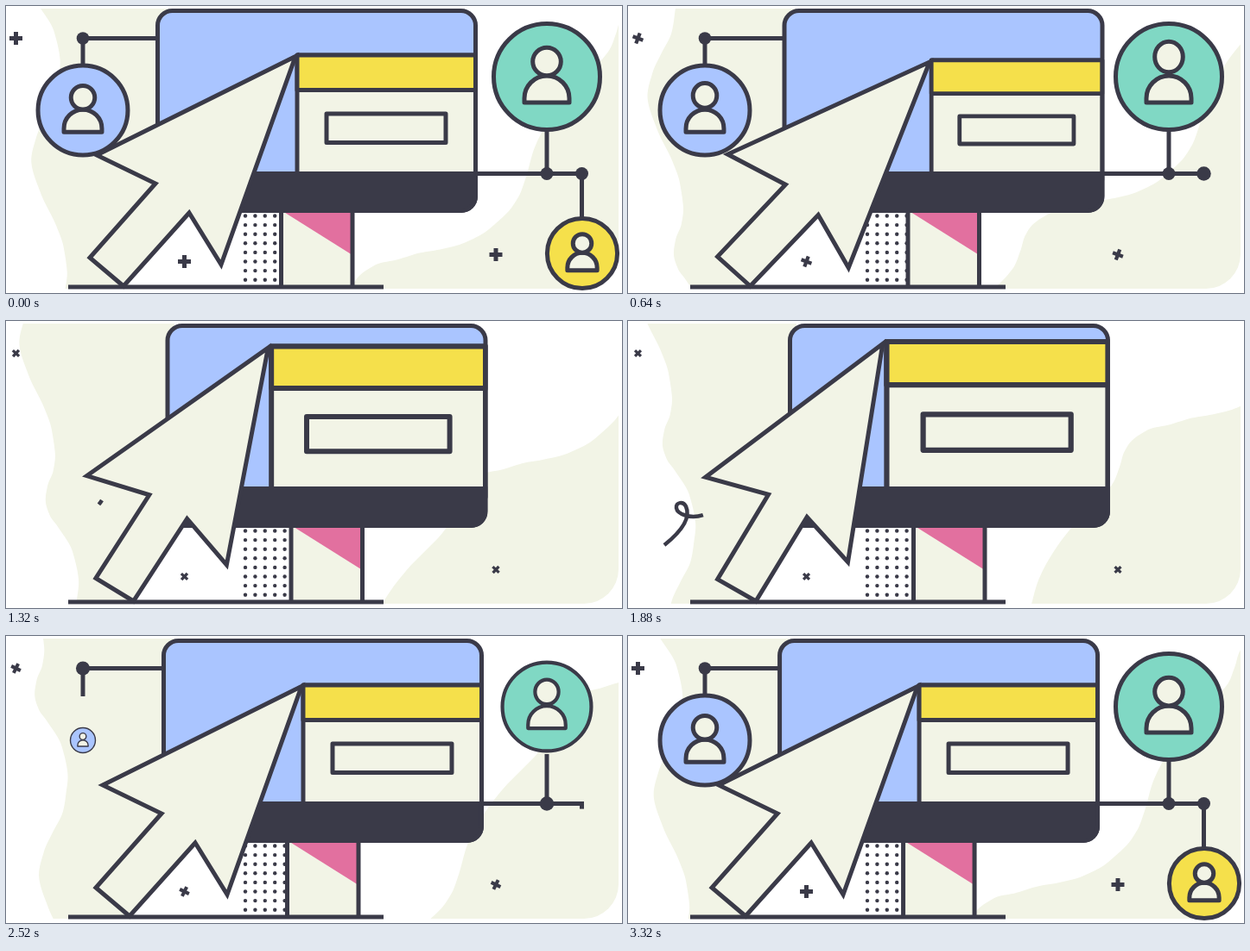
Recreate the animation shown at these times as an HTML page with a canvas. Size 713 by 333 pixels, loop 3360 ms.

```html
<!DOCTYPE html>
<html lang="en">
<head>
<meta charset="utf-8">
<title>Online connections</title>
<style>
  html, body { margin: 0; width: 100%; height: 100%; overflow: hidden; background: #fff; }
  canvas { display: block; }
</style>
</head>
<body>
<canvas id="stage" width="713" height="333"></canvas>
<script>
const g = document.getElementById('stage').getContext('2d');
const LOOP = 3360;
const INK = '#3a3a48', CREAM = '#f2f4e6', BLUE = '#aac5ff',
      YELLOW = '#f5e04b', GREEN = '#80d8c4', PINK = '#e2709f';

// Periodic monotone cubic through [x, y] points
function spline(period, points) {
  const n = points.length;
  const at = i => {
    const turn = Math.floor(i / n), [x, y] = points[i - turn * n];
    return [x + turn * period, y];
  };
  const secant = i => (at(i + 1)[1] - at(i)[1]) / (at(i + 1)[0] - at(i)[0]);
  const slope = i => {
    const a = secant(i - 1), b = secant(i);
    return a * b > 0 ? 2 * a * b / (a + b) : 0;
  };
  return x => {
    x -= Math.floor((x - points[0][0]) / period) * period;
    let i = 0;
    while (i < n - 1 && at(i + 1)[0] <= x) i++;
    const [x0, y0] = at(i), [x1, y1] = at(i + 1), h = x1 - x0, k = (x - x0) / h;
    return y0 + k * k * (3 - 2 * k) * (y1 - y0)
      + h * k * (1 - k) * ((1 - k) * slope(i) - k * slope(i + 1));
  };
}

const TIMES = [0, 640, 1320, 1880, 2520, 2960];
const track = (...values) => spline(LOOP, TIMES.map((t, i) => [t, values[i]]));
const shiftAt = track(0, 5.5, 11.5, 12, 7, 3.5);
const zoomAt = track(1, .958, 1.2, 1.24, 1, 1);
const nodAt = track(0, -5.5, 0, 0, -3, .8);

const LEFT_WAVE = 392, RIGHT_WAVE = 622;
const leftEdge = spline(LEFT_WAVE, [[0, 38], [30, 53], [62, 57], [85, 53], [106, 47.5],
  [130, 33.5], [152, 21.5], [182, 13], [217, 20.5], [256, 35.5], [280, 41.5],
  [307, 43], [328, 39], [345, 31], [364, 27], [380, 30.5]]);
const rightEdge = spline(RIGHT_WAVE, [[0, 752], [22, 750], [52, 738], [75, 726], [95, 722],
  [127, 728], [158, 747], [190, 764], [217, 783], [255, 805], [300, 818], [340, 820],
  [370, 815], [400, 802], [450, 775], [487, 763], [530, 755], [570, 752]]);

const ramp = (t, a, b) => Math.min(1, Math.max(0, (t - a) / (b - a)));
const shown = (t, outA, outB, inA, inB) =>
  t < 1680 ? 1 - ramp(t, outA, outB) : ramp(t, inA, inB);
const pop = k => Math.sin(2 * k) / Math.sin(2);

function paint(fill, width) {
  if (fill) { g.fillStyle = fill; g.fill(); }
  if (width) { g.strokeStyle = INK; g.lineWidth = width; g.stroke(); }
}

function box(x, y, w, h, fill, width, radius = 0) {
  g.beginPath();
  g.roundRect(x, y, w, h, radius);
  paint(fill, width);
}

function line(x1, y1, x2, y2, k = 1) {
  if (k <= 0) return;
  g.beginPath();
  g.moveTo(x1, y1);
  g.lineTo(x1 + (x2 - x1) * k, y1 + (y2 - y1) * k);
  paint(null, 5);
}

function dot(x, y, r) {
  if (r <= 0) return;
  g.beginPath();
  g.arc(x, y, r, 0, 7);
  paint(INK);
}

function polygon(points, fill, width) {
  g.beginPath();
  points.forEach(p => g.lineTo(...p));
  g.closePath();
  paint(fill, width);
}

function placed(x, y, angle, scale, draw) {
  g.save();
  g.translate(x, y);
  g.rotate(angle * Math.PI / 180);
  g.scale(scale, scale);
  draw();
  g.restore();
}

function avatar(x, y, size, k, fill, nod) {
  if (k <= 0) return;
  placed(x, y, 0, size * pop(k), () => {
    const w = 5 / size;
    g.beginPath();
    g.arc(0, 0, 61.5, 0, 7);
    paint(fill, w);
    g.beginPath();
    g.moveTo(-26, 30);
    g.lineTo(-26, 25);
    g.arc(0, 25, 26, Math.PI, 0);
    g.lineTo(26, 30);
    g.closePath();
    paint(CREAM, w);
    g.beginPath();
    g.ellipse(0, -17.5 + nod, 16.3, 16.3 - nod * .27, 0, 0, 7);
    paint(CREAM, w);
  });
}

function blobs(t) {
  const left = [], right = [];
  for (let y = 3; y <= 328; y += 2.5)
    left.push([leftEdge(y + LEFT_WAVE * t / LOOP) + .09 * y, y]);
  polygon([...left, [141, 328], [185, 200], [195, 3]], CREAM);

  g.save();
  g.beginPath();
  g.roundRect(330, 3, 379, 325, [0, 0, 40, 0]);
  g.clip();
  // Diagonal wave: p runs along the edge, q across it
  for (let p = 40; p <= 730; p += 4) {
    const q = rightEdge(p - RIGHT_WAVE * t / LOOP);
    right.push([(p + q) / 2, (q - p) / 2]);
  }
  polygon([...right, [800, 420], [400, 420]], CREAM);
  g.restore();
}

function network(t) {
  const nod = nodAt(t);
  line(190, 37.5, 89, 37.5, shown(t, 1000, 1200, 2150, 2350));
  line(89, 37.5, 89, 70, shown(t, 900, 1000, 2380, 2500));
  dot(89, 37.5, 7.3 * pop(shown(t, 980, 1140, 2360, 2560)));
  avatar(89, 121, .845, shown(t, 700, 960, 2480, 2800), BLUE, nod / 2);

  line(530, 194.5, 669, 194.5, shown(t, 900, 1120, 2250, 2500));
  line(626, 194.5, 626, 137, shown(t, 880, 1000, 2380, 2500));
  line(666.5, 194.5, 666.5, 250, shown(t, 440, 560, 2505, 2650));
  dot(626, 194.5, 7.5 * pop(shown(t, 860, 1020, 2360, 2560)));
  dot(666.5, 194.5, 7.5 * pop(shown(t, 600, 800, 2530, 2720)));
  avatar(626, 82, 1, shown(t, 680, 920, 2400, 2680), GREEN, nod);
  avatar(667, 287, .66, shown(t, 200, 440, 2620, 2900), YELLOW, nod);
}

function monitor(shift, zoom) {
  g.save();
  g.translate(shift, 0);
  box(318.5, 237, 83, 90, CREAM);
  polygon([[320, 238], [401, 238], [401, 289]], PINK);
  line(318.5, 237, 318.5, 328);
  line(401, 237, 401, 328);

  box(175.5, 5.5, 368, 232, BLUE, 0, 17);
  g.save();
  g.beginPath();
  g.roundRect(173, 3, 373, 237, 19);
  g.clip();
  placed(543.5, 194.5, 0, zoom, () => {
    box(-206.5, -137.5, 206.5, 145, CREAM, 5);
    box(-206.5, -137.5, 206.5, 40.5, YELLOW, 5);
    box(-172.5, -69.5, 138, 33.5, CREAM, 5);
  });
  box(173, 192, 373, 48, INK);
  g.restore();
  box(175.5, 5.5, 368, 232, null, 5, 17);
  g.restore();
}

function squiggle(t) {
  const head = 140 * ramp(t, 1300, 1800);
  const tail = t < 1880 ? 30 * ramp(t, 1700, 1880) : 30 + 110 * ramp(t, 1880, 2160);
  if (head <= tail) return;
  g.save();
  g.beginPath();
  g.moveTo(111, 208);
  g.bezierCurveTo(104, 219, 96, 223, 87, 225);
  g.bezierCurveTo(72, 230, 57, 224, 56, 217);
  g.bezierCurveTo(55, 210, 64, 209, 67, 215);
  g.bezierCurveTo(72, 226, 67, 240, 42, 260);
  g.setLineDash([0, tail, head - tail, 999]);
  paint(null, 4.5);
  g.restore();
}

function draw(now) {
  const t = now % LOOP, shift = shiftAt(t), zoom = zoomAt(t), turn = shift / 12;
  g.clearRect(0, 0, 713, 333);
  g.lineJoin = 'round';
  blobs(t);
  network(t);

  for (let x = 277; x < 330; x += 11.4)
    for (let y = 243.5; y < 324; y += 10.6) dot(x, y, 2.2);
  monitor(shift, zoom);
  line(72, 326, 437, 326);

  g.lineJoin = 'miter';
  placed(136 + shift, 325, -44 * (zoom - 1), 1, () =>
    polygon([[0, 0], [-39, -33], [37, -119], [-31, -152], [199, -266.5], [113, -25], [76, -85]],
      CREAM, 5));

  for (const [x, y] of [[11.5, 37.5], [206.5, 296.5], [567, 288.5]])
    placed(x, y, 45 * turn, 1 - .35 * turn, () => {
      line(-7.5, 0, 7.5, 0);
      line(0, -7.5, 0, 7.5);
    });
  squiggle(t);
}

const start = performance.now();
function frame() {
  draw(performance.now() - start);
  requestAnimationFrame(frame);
}
frame();
</script>
</body>
</html>
```
